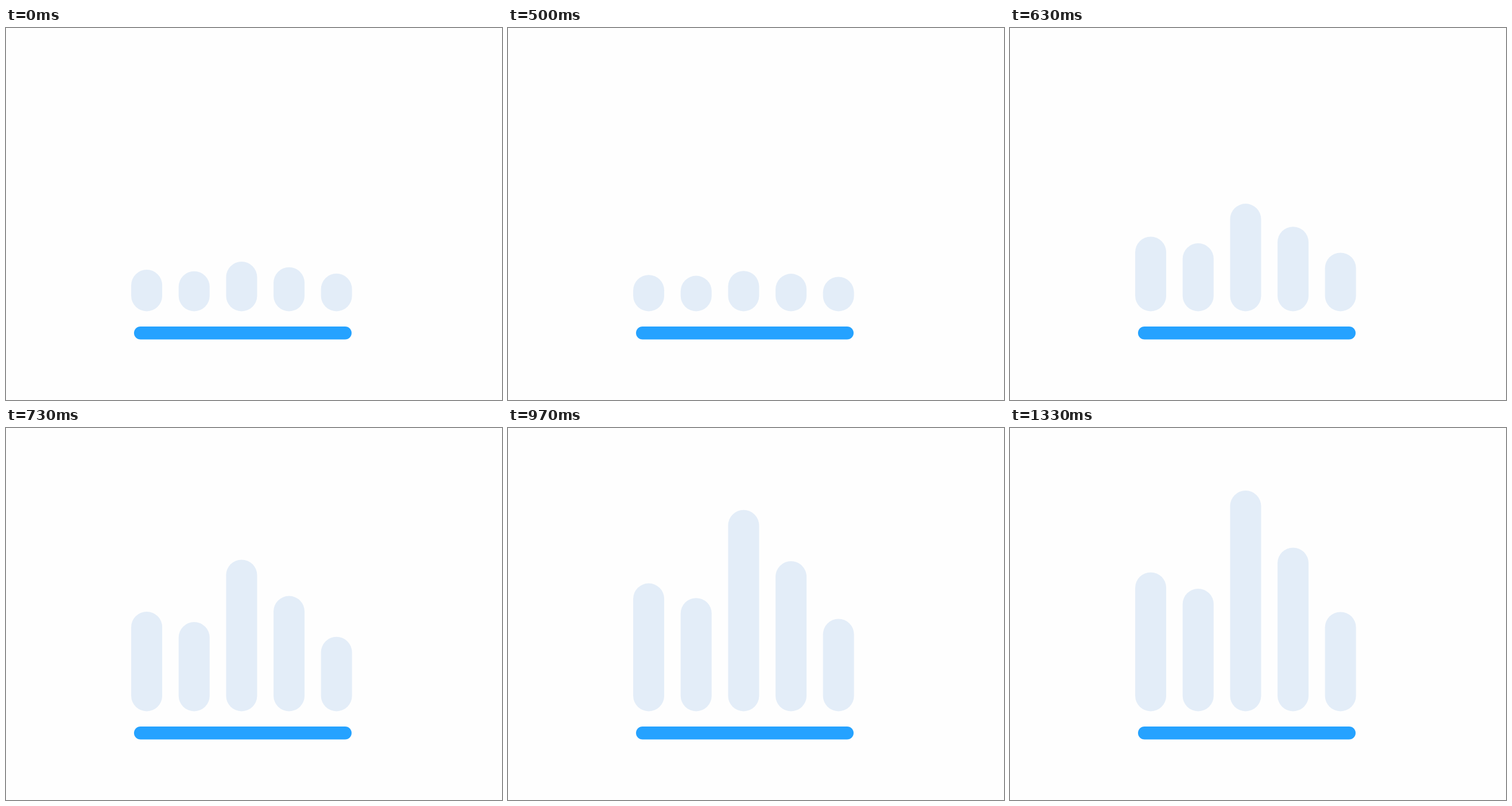
These frames come from a looping animation (864x648 px, 2010 ms). An HTML page:

```html
<!DOCTYPE html>
<html lang="en">
<head>
<meta charset="utf-8">
<title>Bar chart</title>
<style>
  html, body { margin: 0; width: 100%; height: 100%; overflow: hidden; background: #fefefe; }
  svg { display: block; width: 100%; height: 100%; }
</style>
</head>
<body>
<svg viewBox="0 0 864 648">
  <g id="bars" fill="#e3edf8"></g>
  <rect x="223" y="520" width="379" height="22.6" rx="11.3" fill="#25a2ff"/>
</svg>
<script>
const LOOP = 2010;
const WIDTH = 54;
const BASELINE = 493.4;
const FIRST_X = 245.1;
const SPACING = 82.65;
const LENGTHS = [188, 159.5, 330.4, 231, 119];

const REST = 0.098;
const DIP = 0.049;

const group = document.getElementById('bars');
const bars = LENGTHS.map((length, i) => {
  const rect = document.createElementNS('http://www.w3.org/2000/svg', 'rect');
  rect.setAttribute('x', FIRST_X + i * SPACING - WIDTH / 2);
  rect.setAttribute('width', WIDTH);
  rect.setAttribute('rx', WIDTH / 2);
  group.append(rect);
  return { rect, length };
});

// Ease curve with flat ends; x1 and x2 set how long each end stays slow.
function ease(x, x1, x2) {
  if (x <= 0) return 0;
  if (x >= 1) return 1;
  let low = 0, high = 1;
  for (let i = 0; i < 30; i++) {
    const m = (low + high) / 2, n = 1 - m;
    if (3 * x1 * m * n * n + 3 * x2 * m * m * n + m ** 3 < x) low = m;
    else high = m;
  }
  return low * low * (3 - 2 * low);
}

// Growth of the bars at a step of 1/30 s: a short dip, then a quick rise.
function growth(step) {
  if (step < 15) return REST + (DIP - REST) * ease((step - 10) / 5, 0.167, 0.833);
  return DIP + (1 - DIP) * ease((step - 15) / 25, 0.132, 0.108);
}

function render(time) {
  // Steps fall on multiples of 10 ms.
  const step = Math.floor(0.3 * Math.floor(time / 10) + 0.15);
  const scale = growth(step);
  for (const { rect, length } of bars) {
    const height = WIDTH + length * scale;
    rect.setAttribute('y', BASELINE - height);
    rect.setAttribute('height', height);
  }
}

const start = performance.now();
function tick() {
  render((performance.now() - start) % LOOP);
  requestAnimationFrame(tick);
}
tick();
</script>
</body>
</html>
```
